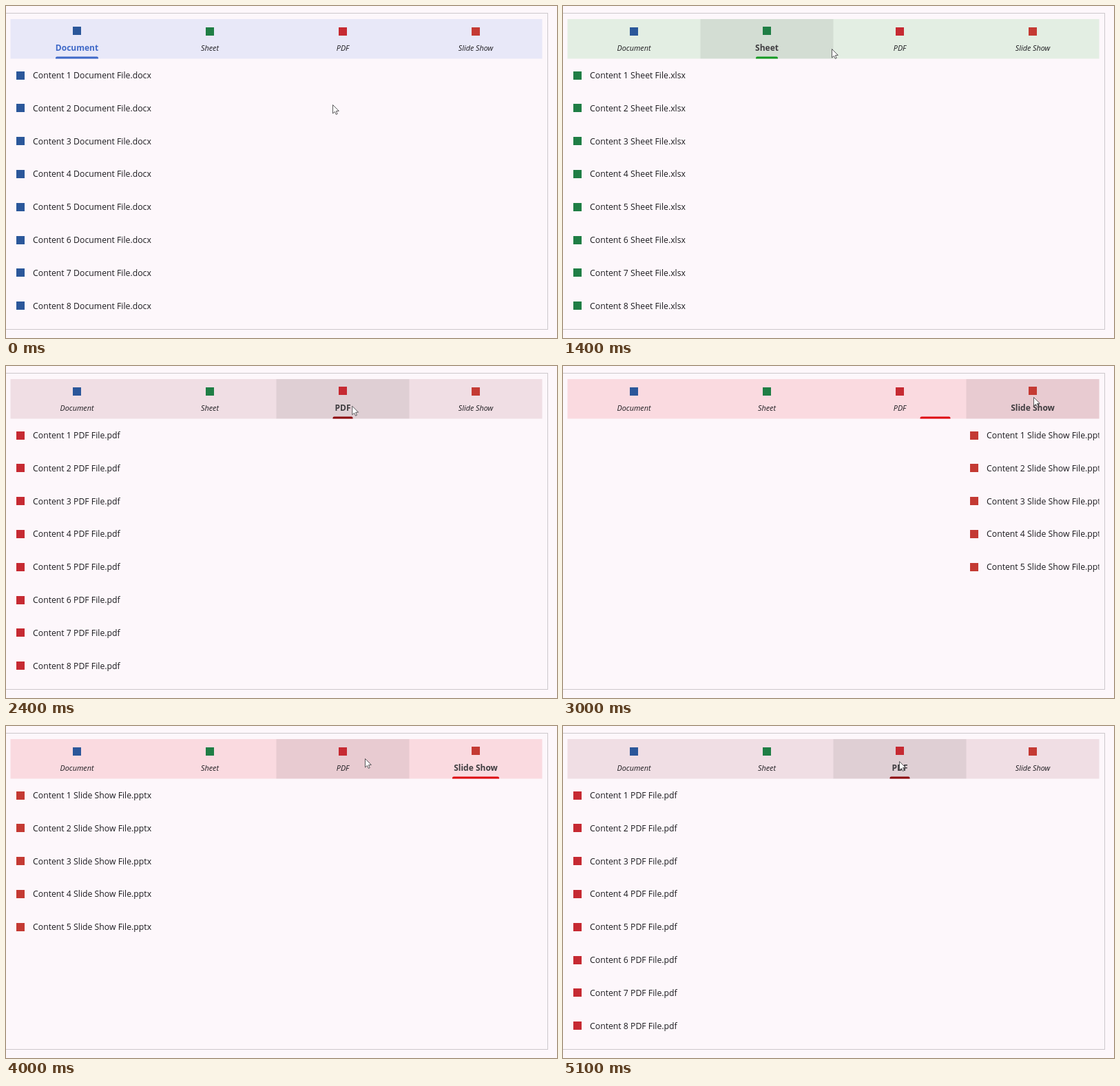
Recreate the animation shown at these times as an HTML page with a canvas. Size 800 px wide and 482 px high, loop 5200 ms.

```html
<!DOCTYPE html>
<html lang="en">
<head>
<meta charset="utf-8">
<title>Tab view</title>
<style>
  html, body { margin: 0; width: 100%; height: 100%; overflow: hidden; background: #fdf7fb; }
  canvas { display: block; }
</style>
</head>
<body>
<canvas id="stage" width="800" height="482"></canvas>
<script>
const ctx = document.getElementById('stage').getContext('2d');
const LOOP = 5200, STEP = 100, SLIDE = 260;
const BAR = { x: 6.5, y: 19, w: 772, h: 57.5 };
const TAB_W = BAR.w / 4, ROW_H = 47.8;
const FONT = '"Open Sans", "Noto Sans", sans-serif';

const tabs = [
  { name: 'Document', ext: 'docx', rows: 8, icon: '#2b579a', bar: '#e8e8f8', line: '#3f69c8', lineW: 62 },
  { name: 'Sheet', ext: 'xlsx', rows: 8, icon: '#1f7e45', bar: '#e3eee3', line: '#149a22', lineW: 32 },
  { name: 'PDF', ext: 'pdf', rows: 8, icon: '#c62a32', bar: '#f0dee4', line: '#8b0008', lineW: 29 },
  { name: 'Slide Show', ext: 'pptx', rows: 5, icon: '#c43a33', bar: '#fadae0', line: '#de0610', lineW: 68 }
];
tabs.forEach((tab, i) => { tab.cx = BAR.x + TAB_W * (i + 0.5); });

// Tab changes; stretch widens the indicator in mid-flight.
const moves = [
  { at: 801, from: 0, to: 1, stretch: 63 },
  { at: 1943, from: 1, to: 2, stretch: 25 },
  { at: 2934, from: 2, to: 3, stretch: 7 },
  { at: 4150, from: 3, to: 2, stretch: 10 }
];

// Pointer path: time, x, y
const pointerPath = [
  [0, 474, 143], [100, 470, 141], [600, 308, 68], [900, 303, 62], [1200, 303, 62],
  [1400, 390, 62], [1900, 442, 62], [2300, 442, 62], [2700, 683, 45],
  [3500, 683, 45], [4000, 521, 47], [4200, 488, 51], [LOOP, 488, 51]
];

const lerp = (a, b, p) => a + (b - a) * p;

function pointerAt(t) {
  const i = pointerPath.findIndex(k => k[0] > t);
  const [t0, x0, y0] = pointerPath[i - 1];
  const [t1, x1, y1] = pointerPath[i];
  const p = (t - t0) / (t1 - t0);
  return { x: lerp(x0, x1, p), y: lerp(y0, y1, p) };
}

function rect(color, x, y, w, h) {
  ctx.fillStyle = color;
  ctx.fillRect(x, y, w, h);
}

function text(str, x, y, font, color, align) {
  ctx.font = font + ' ' + FONT;
  ctx.fillStyle = color;
  ctx.textAlign = align;
  ctx.fillText(str, x, y);
}

function square(color, cx, cy) {
  rect(color, cx - 6, cy - 6, 12, 12);
}

function drawFrame() {
  ctx.strokeStyle = '#cdc8cc';
  ctx.lineWidth = 1;
  ctx.strokeRect(-2.5, 10.5, 789, 459);
}

function drawBar(selected, pointer) {
  rect(tabs[selected].bar, BAR.x, BAR.y, BAR.w, BAR.h);
  if (pointer.y < BAR.y + BAR.h) {
    const hovered = Math.floor((pointer.x - BAR.x) / TAB_W);
    rect('rgba(28,27,31,0.08)', BAR.x + hovered * TAB_W, BAR.y, TAB_W, BAR.h);
  }
  tabs.forEach((tab, i) => {
    const on = i === selected;
    const color = !on ? '#1c1b1f' : i === 0 ? '#3f69c8' : '#3f3d40';
    square(tab.icon, tab.cx, on ? 36 : 37);
    text(tab.name, tab.cx, 65.3, on ? 'bold 12px' : 'italic 10.8px', color, 'center');
  });
}

function drawIndicator(from, to, p, stretch) {
  const left = lerp(from.cx - from.lineW / 2, to.cx - to.lineW / 2, p);
  const width = lerp(from.lineW, to.lineW, p) + stretch * Math.sin(Math.PI * p);
  ctx.fillStyle = to.line;
  ctx.beginPath();
  ctx.roundRect(left, 73.6, width, 2.9, [2, 2, 0, 0]);
  ctx.fill();
}

function drawList(tab, dx) {
  for (let i = 0; i < tab.rows; i++) {
    const y = 100.5 + i * ROW_H;
    square(tab.icon, 21 + dx, Math.round(y));
    text(`Content ${i + 1} ${tab.name} File.${tab.ext}`, 39 + dx, Math.round(y + 4.55), '12.25px', '#1c1b1f', 'left');
  }
}

function drawLists(move, p) {
  const dir = Math.sign(move.to - move.from);
  ctx.save();
  ctx.beginPath();
  ctx.rect(BAR.x, 77, BAR.w, 390);
  ctx.clip();
  if (p < 1) drawList(tabs[move.from], Math.round(-dir * p * BAR.w));
  drawList(tabs[move.to], Math.round(dir * (1 - p) * BAR.w));
  ctx.restore();
}

function drawPointer({ x, y }) {
  ctx.save();
  ctx.translate(x + 0.5, y + 0.5);
  ctx.beginPath();
  [[0, 0], [0, 12.5], [2.9, 9.9], [4.8, 14], [6.7, 13.1], [4.9, 9.1], [8.8, 8.9]]
    .forEach(([px, py]) => ctx.lineTo(px, py));
  ctx.closePath();
  ctx.fillStyle = '#fff';
  ctx.fill();
  ctx.strokeStyle = '#4a484b';
  ctx.lineWidth = 0.9;
  ctx.stroke();
  ctx.restore();
}

function draw(now) {
  const t = Math.floor((now % LOOP) / STEP) * STEP;
  const move = moves.filter(m => m.at <= t).pop() || { at: -SLIDE, from: 0, to: 0, stretch: 0 };
  const p = Math.min(1, (t - move.at) / SLIDE);
  const pointer = pointerAt(t);
  rect('#fdf7fb', 0, 0, 800, 482);
  drawFrame();
  drawBar(move.to, pointer);
  drawLists(move, p);
  drawIndicator(tabs[move.from], tabs[move.to], p, move.stretch);
  drawPointer(pointer);
}

const start = performance.now();
function tick() {
  draw(performance.now() - start);
  requestAnimationFrame(tick);
}
tick();
</script>
</body>
</html>
```
